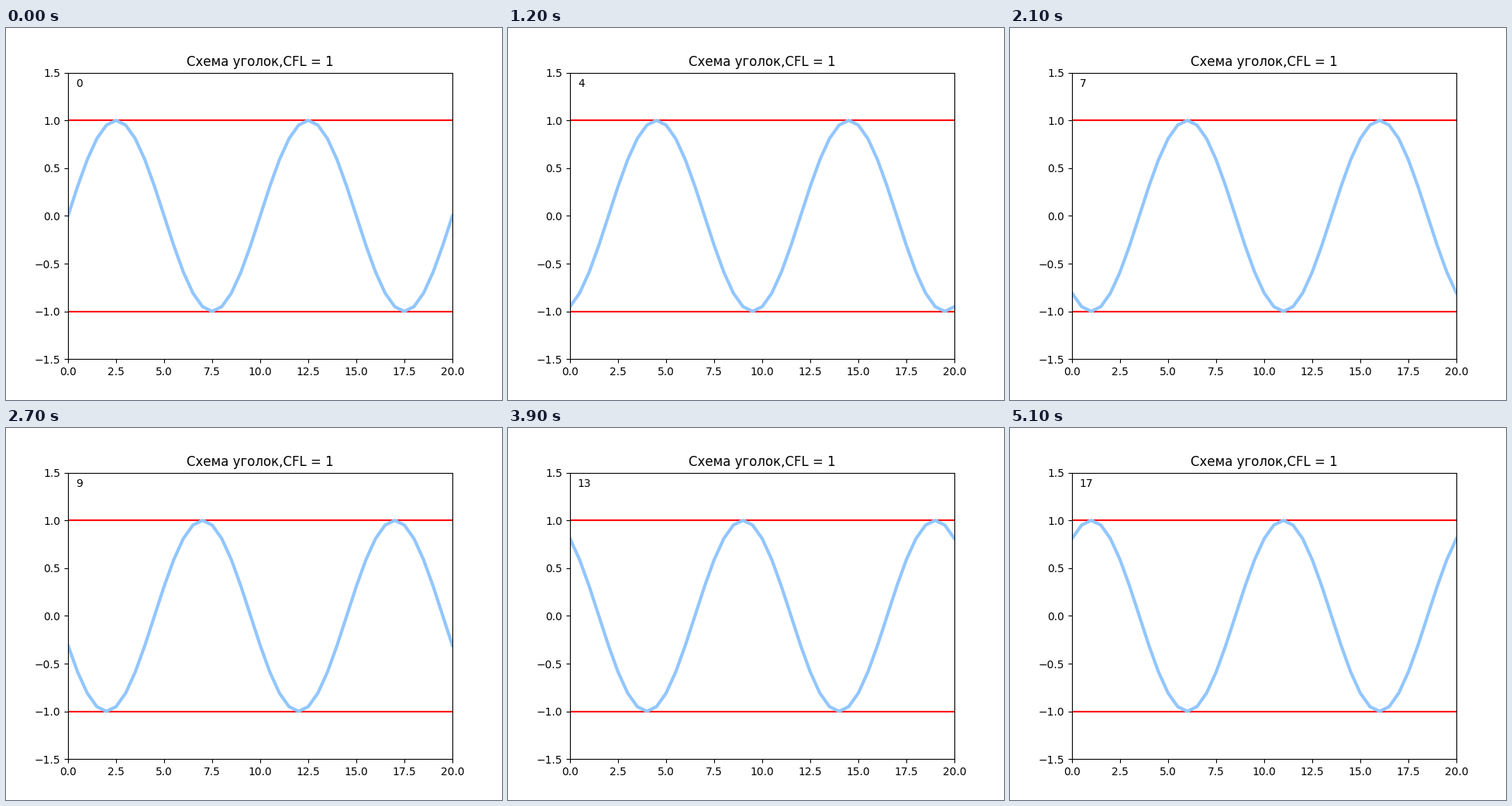
Recreate the animation shown at these times as a matplotlib script. Size 640 px wide and 480 px high, loop 5400 ms.

```python
import numpy as np
import matplotlib.pyplot as plt
from matplotlib.animation import FuncAnimation

LENGTH, STEP = 20, 0.5
FRAMES, INTERVAL = 18, 300

x = np.linspace(0, LENGTH, int(LENGTH / STEP) + 1)

fig, ax = plt.subplots(figsize=(6.4, 4.8), dpi=100)
ax.set(xlim=(0, LENGTH), ylim=(-1.5, 1.5), title="Схема уголок,CFL = 1")
for level in (-1, 1):
    ax.plot([0, LENGTH], [level, level], color="red", lw=1.5)
wave, = ax.plot([], [], color="#92C6FF", lw=3)
counter = ax.text(0.02, 0.95, "", transform=ax.transAxes)


def update(step):
    # At CFL = 1 the wave moves exactly one grid cell per time step.
    wave.set_data(x, np.sin(2 * np.pi * (x - step * STEP) / 10))
    counter.set_text(str(step))
    return wave, counter


anim = FuncAnimation(fig, update, frames=FRAMES, interval=INTERVAL,
                     repeat=True, repeat_delay=0)
plt.show()
```
